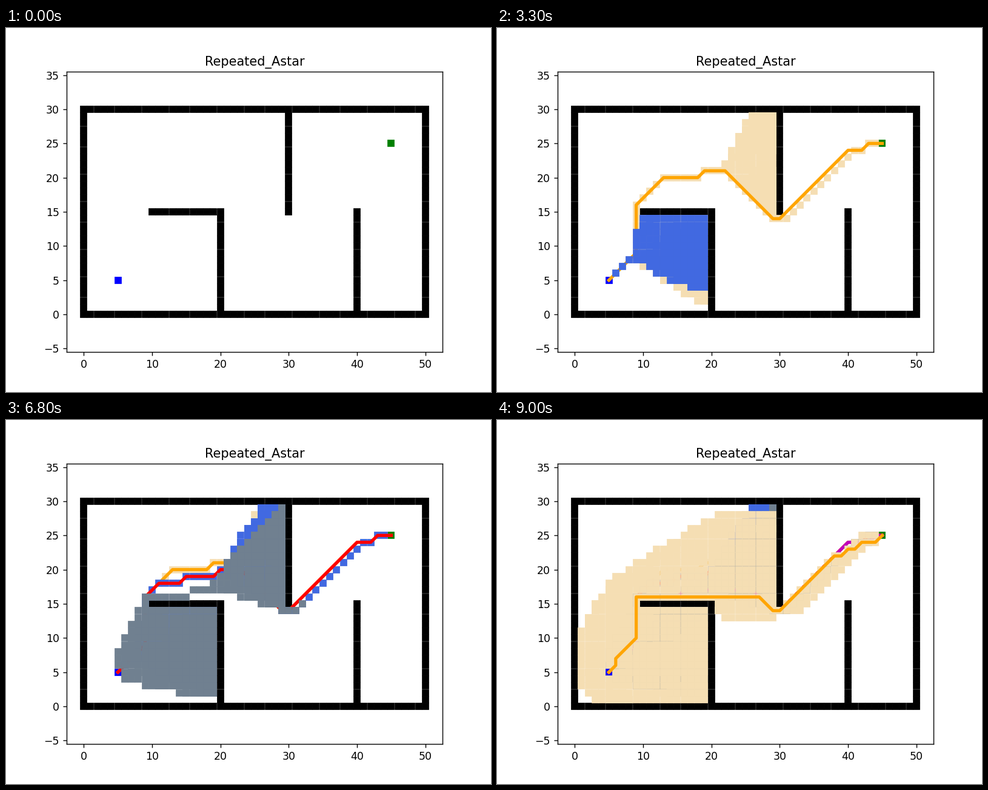
A matplotlib script that plays this animation: 800 px wide and 600 px high, repeating every 9.1 s.

```python
import math

import matplotlib.pyplot as plt
import numpy as np
from matplotlib.animation import FuncAnimation

START, GOAL = (5, 5), (45, 25)
WIDTH, HEIGHT = 51, 31
MOVES = [(-1, 0), (-1, 1), (0, 1), (1, 1), (1, 0), (1, -1), (0, -1), (-1, -1)]
FRAMES = 91


def build_walls():
    walls = set()
    for x in range(WIDTH):
        walls |= {(x, 0), (x, HEIGHT - 1)}
    for y in range(HEIGHT):
        walls |= {(0, y), (WIDTH - 1, y)}
    walls |= {(x, 15) for x in range(10, 21)}
    walls |= {(20, y) for y in range(15)}
    walls |= {(30, y) for y in range(15, 30)}
    walls |= {(40, y) for y in range(16)}
    return walls


WALLS = build_walls()


def blocked(a, b):
    # A diagonal step may not cut a wall corner.
    return any(c in WALLS for c in (a, b, (a[0], b[1]), (b[0], a[1])))


def search(weight):
    """Weighted A*: every expanded cell in order, repeats included."""
    def h(s):
        return math.hypot(GOAL[0] - s[0], GOAL[1] - s[1])

    g = {START: 0}
    queue = [(weight * h(START), START)]
    order = []
    while queue:
        best = min(queue)
        queue.remove(best)
        s = best[1]
        if s == GOAL:
            break
        if s != START:
            order.append(s)
        for dx, dy in MOVES:
            n = (s[0] + dx, s[1] + dy)
            if blocked(s, n):
                continue
            cost = g[s] + math.hypot(dx, dy)
            if cost < g.get(n, math.inf):
                g[n] = cost
                queue.append((cost + weight * h(n), n))
    return order


def expansions_until(order, count):
    """Expansions needed to cover `count` different cells."""
    seen = set()
    for i, cell in enumerate(order, 1):
        seen.add(cell)
        if len(seen) == count:
            return i
    return len(order)


class Run:
    def __init__(self, ax, weight, fill, stroke, begin, done, pace, path):
        order = search(weight)
        self.cells = np.array(order)
        self.times = [begin] + [t for t, _ in pace] + [done]
        self.counts = [0] + [expansions_until(order, n) for _, n in pace]
        self.counts.append(len(order))
        self.path_at = done + 1
        self.marks, = ax.plot([], [], "s", color=fill)
        self.line, = ax.plot(*zip(*path), color=stroke, linewidth=3)

    def show(self, frame):
        n = int(round(np.interp(frame, self.times, self.counts)))
        self.marks.set_data(self.cells[:n, 0], self.cells[:n, 1])
        self.line.set_visible(frame >= self.path_at)
        return self.marks, self.line


fig, ax = plt.subplots(figsize=(6.4, 4.8), dpi=125)
ax.plot(*START, "bs")
ax.plot(*GOAL, "gs")
ax.plot(*zip(*sorted(WALLS)), "sk")
ax.set_title("Repeated_Astar")
ax.axis("equal")

# pace: (frame, different cells covered by then)
runs = [
    Run(ax, 2.5, "wheat", "orange", 0, 21, [(15, 160)],
        [START, (9, 9), (9, 16), (13, 20), (18, 20), (19, 21), (22, 21),
         (29, 14), (30, 14), (40, 24), (42, 24), (43, 25), GOAL]),
    Run(ax, 2.0, "royalblue", "red", 22, 43, [(33, 104)],
        [START, (9, 9), (9, 16), (11, 18), (14, 18), (15, 19), (19, 19),
         (20, 20), (23, 20), (29, 14), (30, 14), (40, 24), (42, 24),
         (43, 25), GOAL]),
    Run(ax, 1.5, "slategray", "m", 44, 69, [(52, 86), (60, 157), (68, 280)],
        [START, (9, 9), (9, 16), (15, 16), (16, 17), (26, 17), (29, 14),
         (30, 14), (40, 24), (43, 24), (44, 25), GOAL]),
    Run(ax, 1.0, "wheat", "orange", 70, 89, [(78, 209)],
        [START, (6, 6), (6, 7), (9, 10), (9, 16), (27, 16), (29, 14),
         (30, 14), (38, 22), (39, 22), (40, 23), (41, 23), (42, 24),
         (44, 24), GOAL]),
]


def update(frame):
    return [artist for run in runs for artist in run.show(frame)]


anim = FuncAnimation(fig, update, frames=FRAMES, interval=100,
                     repeat=True, repeat_delay=0)
plt.show()
```
